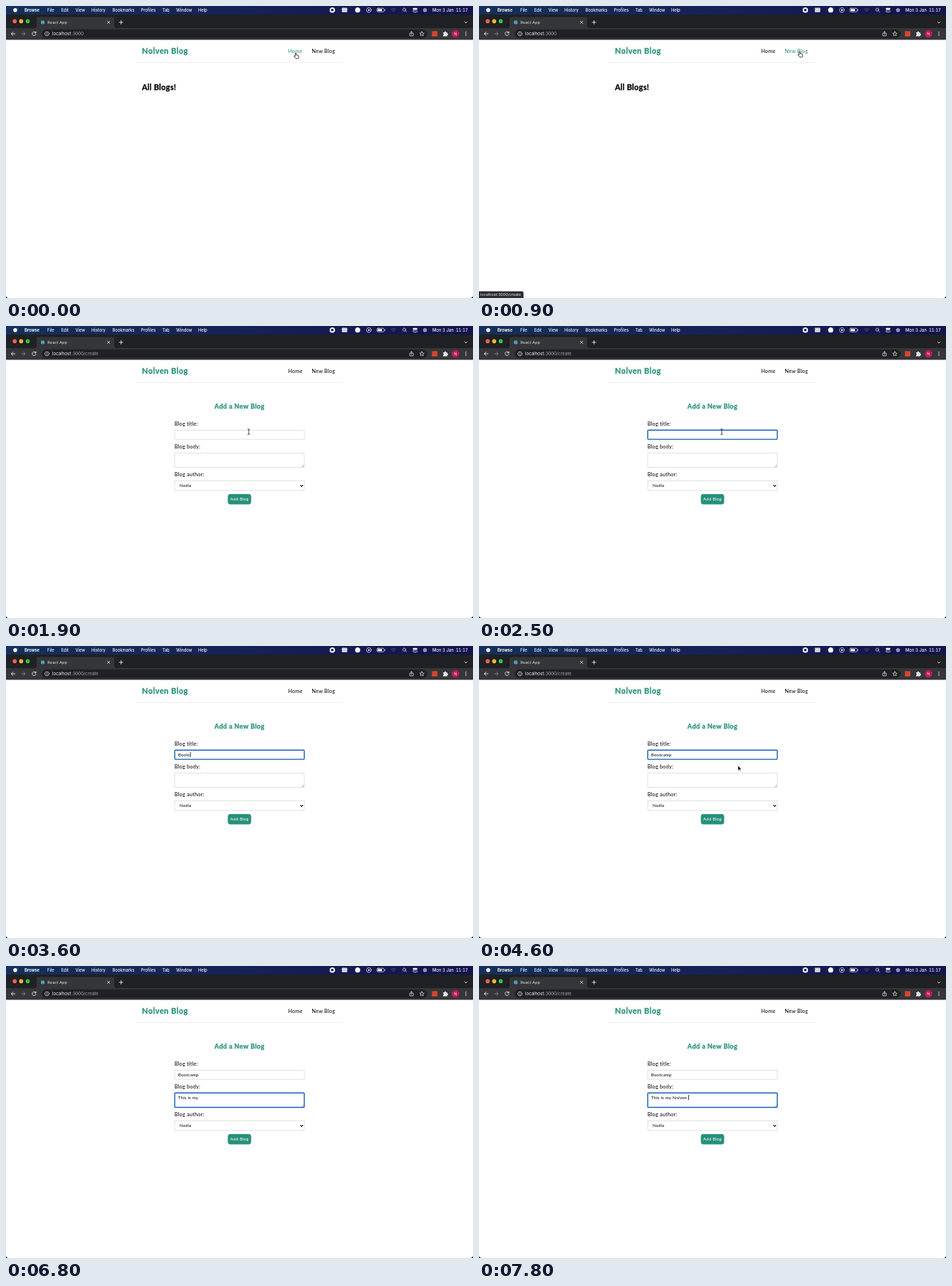
An HTML page that plays this animation: 656 by 410 pixels, repeating every 8 s.

```html
<!DOCTYPE html>
<html lang="en">
<head>
<meta charset="utf-8">
<title>Blog form</title>
<style>
  html, body { margin: 0; width: 100%; height: 100%; overflow: hidden; background: #101216; }
  svg { display: block; width: 656px; height: 410px; }
  text { white-space: pre; }
  .bar { font: 500 5.85px Inter, sans-serif; fill: #f4f6fb; letter-spacing: -.01em; }
  .bar .app { font-weight: 700; }
  .bar .clock { font-variant-numeric: tabular-nums; letter-spacing: .005em; }
  .ui { font: 400 5.47px Inter, sans-serif; fill: #e8eaed; }
  .url { font-size: 6.38px; letter-spacing: -.01em; }
  .page { font: 400 7.29px Lato, sans-serif; letter-spacing: .03em; color: #000; fill: currentColor; }
  .page text { fill: currentColor; }
  .page .h, .page .sub { font-weight: 700; stroke: currentColor; stroke-width: .28; }
  .page .h { font-size: 10.93px; }
  .page .sub { font-size: 9.11px; letter-spacing: .044em; }
  .page .field { font-size: 6.07px; }
  .page .green { color: #27917a; }
  .page .white { color: #fff; }
  .box { fill: #fff; stroke: #d9d9d9; stroke-width: .8; }
  .ring { fill: none; stroke: #1a62b8; stroke-width: 1.4; }
  .line { fill: none; stroke: #e8eaed; stroke-width: .9; stroke-linecap: round; stroke-linejoin: round; }
  .thin { stroke-width: .7; }
  .dim { stroke: #808388; }
</style>
</head>
<body>
<svg viewBox="0 0 656 410">
  <defs>
    <linearGradient id="sky">
      <stop offset="0" stop-color="#15305a"/>
      <stop offset=".45" stop-color="#14235a"/>
      <stop offset="1" stop-color="#15134a"/>
    </linearGradient>
  </defs>

  <!-- menu bar -->
  <rect width="656" height="20" fill="url(#sky)"/>
  <g class="bar" id="menu">
    <circle cx="13" cy="5.7" r="2.8"/>
    <text class="app" x="26" y="7.8">Browse</text>
    <text class="clock" x="599" y="7.8">Mon 3 Jan  11:17</text>
  </g>
  <g fill="#f4f6fb">
    <circle cx="458.4" cy="5.7" r="3.8"/>
    <rect x="456.8" y="4.1" width="3.2" height="3.2" rx=".5" fill="#15205a"/>
    <rect x="471.8" y="2.6" width="7.6" height="6.2" rx="1" fill="#d3d6e2"/>
    <circle cx="494" cy="5.7" r="3.6"/>
    <path d="M508.9 4v3.4l2.8-1.7z"/>
    <rect x="522" y="4.2" width="6.2" height="3" rx=".6"/>
    <rect x="532" y="4.9" width=".8" height="1.7" rx=".4"/>
    <rect x="571.4" y="2.8" width="6.4" height="2.5" rx="1.25"/>
    <circle cx="588.6" cy="5.7" r="2.8" fill="#8d93c4"/>
  </g>
  <g class="line thin">
    <circle cx="509.8" cy="5.7" r="3.3"/>
    <rect x="521" y="3.2" width="10.2" height="5" rx="1.4"/>
    <path d="M541 4.8q3.4-2.8 6.8 0M542.3 6.3q2.1-1.8 4.2 0M544.1 7.7h.6" stroke="#5c648f"/>
    <circle cx="559.5" cy="5.1" r="2.1"/><path d="M561 6.7l1.7 1.8"/>
    <rect x="571.6" y="6.3" width="6" height="2.2" rx="1.1"/>
  </g>

  <!-- browser window -->
  <path d="M0 48V16q0-4 4-4H652q4 0 4 4V48z" fill="#202124"/>
  <path d="M0 31H40q3 0 3-3V18.5q0-3 3-3H149q3 0 3 3V28q0 3 3 3H656V48H0z" fill="#35363a"/>
  <circle cx="12.2" cy="21.4" r="2.8" fill="#fb5f57"/>
  <circle cx="21.3" cy="21.4" r="2.8" fill="#fcbb2f"/>
  <circle cx="30.5" cy="21.4" r="2.8" fill="#2ac840"/>
  <circle cx="51.6" cy="22.9" r="2.7" fill="#4e9dbb"/>
  <text class="ui" x="58.3" y="24.9" letter-spacing=".1">React App</text>
  <rect x="50" y="32.8" width="542" height="12.4" rx="6.2" fill="#202124"/>
  <g class="line">
    <path d="M142.5 21.3l3.2 3.2m0-3.2l-3.2 3.2"/>
    <path d="M159.1 22.9h5m-2.5-2.5v5"/>
    <path d="M644.3 22.2l1.8 1.7 1.8-1.7"/>
    <path d="M12.7 39h-5.2m2.4-2.5l-2.5 2.5 2.5 2.5"/>
    <path class="dim" d="M21.8 39h5.2m-2.4-2.5l2.5 2.5-2.5 2.5"/>
    <path d="M41.7 37.3a2.7 2.7 0 1 0 .4 2.2M42.1 36v1.8h-1.9"/>
  </g>
  <g class="line thin">
    <circle cx="57.5" cy="39" r="2.9"/><path d="M57.5 38.7v1.7m0-3.1v.1"/>
    <path d="M568.5 38.3h-1.4v3.6h5v-3.6h-1.4M569.6 40v-4m-1.3 1.2l1.3-1.3 1.3 1.3"/>
    <path d="M584.2 35.9l.9 2.1 2.2.2-1.7 1.5.5 2.2-1.9-1.2-1.9 1.2.5-2.2-1.7-1.5 2.2-.2z"/>
  </g>
  <rect x="598.4" y="35.3" width="7.6" height="7.4" rx="1" fill="#d8452e"/>
  <path d="M614 37h1.8a1.2 1.2 0 0 1 2.4 0h1.6v1.7a1.2 1.2 0 0 1 0 2.4v1.3H614v-1.7a1.1 1.1 0 0 0 0-2.2z" fill="#e8eaed"/>
  <circle cx="631.4" cy="39" r="5.3" fill="#c2185b"/>
  <text class="ui" x="631.4" y="41" text-anchor="middle">N</text>
  <g fill="#e8eaed">
    <circle cx="646" cy="36.7" r=".75"/><circle cx="646" cy="39" r=".75"/><circle cx="646" cy="41.3" r=".75"/>
  </g>
  <text class="ui url" x="64.7" y="41.2">localhost<tspan fill="#9aa0a6">:3000<tspan id="path">/create</tspan></tspan></text>

  <!-- page -->
  <path d="M0 47.6H656V406q0 4-4 4H4q-4 0-4-4z" fill="#fff"/>
  <path d="M182 79.5H473" stroke="#f0f0f0"/>
  <g class="page">
    <text class="h green" x="191" y="67.4" style="letter-spacing:.045em">Nolven Blog</text>
    <text id="home" x="396.2" y="66.2">Home</text>
    <text id="new" x="429.5" y="66.2">New Blog</text>
    <text id="list" class="h" x="191" y="118" style="letter-spacing:.025em">All Blogs!</text>
    <g id="form">
      <text class="sub green" x="328" y="116.3" text-anchor="middle">Add a New Blog</text>
      <text x="236.8" y="139.7">Blog title:</text>
      <text x="236.8" y="171.5">Blog body:</text>
      <text x="236.8" y="210.6">Blog author:</text>
      <rect class="box" x="237" y="146.3" width="182" height="12.8"/>
      <rect class="box" x="237" y="178.3" width="182" height="20.2"/>
      <rect class="box" x="237" y="217.3" width="182" height="13.6"/>
      <path d="M415.5 197.8l2.9-2.9m-1.3 2.9l1.3-1.3" stroke="#777" stroke-width=".6"/>
      <path d="M413.4 223.4l1.9 1.9 1.9-1.9" fill="none" stroke="#000" stroke-width="1.1"/>
      <text class="field" x="243.8" y="226.4">Nadia</text>
      <rect x="311.6" y="236" width="32.8" height="14.4" rx="3.6" fill="#27917a"/>
      <text class="field white" x="328" y="245.4" text-anchor="middle">Add Blog</text>
      <rect id="ring" class="ring" x="237" width="182" rx="1"/>
      <text id="title" class="field" xml:space="preserve" x="241.8" y="154.9"></text>
      <text id="body" class="field" xml:space="preserve" x="241.8" y="186.7"></text>
      <rect id="caret" width=".8" height="7"/>
    </g>
  </g>

  <g id="status">
    <path id="bubble" fill="#2b2c30" stroke="#000" stroke-opacity=".22"/>
    <text id="link" class="ui" x="2" y="407.3"></text>
  </g>

  <g id="pointer" stroke-linejoin="round">
    <path id="hand" d="M-1.8 .6V-3q0-.9.8-.9t.8.9v2.1q.8-.6 1.3.1.7-.4 1.1.2 1-.2 1 .8v1.6Q3.2 3.8 1.8 3.8H-.6Q-1.5 3.6-3.3 .9q-.2-.9.6-.9z" fill="#fff" stroke="#000" stroke-width=".75"/>
    <path id="beam" d="M-1.7-3.9Q0-3.9 0-2.9 0-3.9 1.7-3.9M0-3V3M-1.7 3.9Q0 3.9 0 2.9 0 3.9 1.7 3.9" fill="none" stroke="#111" stroke-width=".8"/>
    <path id="arrow" d="M-2.2-4V3.2L-.6 1.7.4 4.1 1.5 3.6.5 1.3H2.7z" fill="#000" stroke="#fff" stroke-width=".6"/>
  </g>
</svg>
<script>
const LOOP = 8000, STEP = 100;
const el = Object.fromEntries([...document.querySelectorAll('[id]')].map(n => [n.id, n]));
const show = (node, on) => { node.style.display = on ? '' : 'none'; };
const clamp = v => Math.max(0, Math.min(1, v));

const menu = { File: 58, Edit: 77.5, View: 97.5, History: 120, Bookmarks: 149.5, Profiles: 189.5, Tab: 219.5, Window: 239, Help: 270 };
for (const [label, x] of Object.entries(menu)) {
  const item = document.createElementNS('http://www.w3.org/2000/svg', 'text');
  item.setAttribute('x', x);
  item.setAttribute('y', 7.8);
  item.textContent = label;
  el.menu.append(item);
}

// Pointer path: time, x, y
const track = [
  [0, 408, 70], [200, 408, 70], [600, 418, 70], [700, 418, 70], [900, 451.5, 68],
  [1200, 451.5, 68], [1500, 395, 108], [1700, 343, 130], [1900, 341, 148.5],
  [4200, 341, 148.5], [4400, 368, 160], [4500, 375, 165], [4700, 357, 178.5], [LOOP, 357, 178.5]
];

// Typing: time and number of characters
const fields = {
  title: { text: 'Bootcamp', top: 146.3, height: 12.8, caret: 149, from: 2000, to: 4700,
    keys: [[2000, 0], [3100, 1], [3300, 3], [3400, 4], [3600, 5], [3800, 6], [3900, 7], [4000, 8]] },
  body: { text: 'This is my Nolven ', top: 178.3, height: 20.2, caret: 181, from: 4700, to: LOOP,
    keys: [[4700, 0], [5300, 1], [5500, 2], [5600, 3], [5700, 4], [5800, 5], [5900, 6], [6000, 7],
      [6100, 8], [6200, 9], [6300, 11], [6900, 12], [7100, 13], [7300, 14], [7400, 15], [7600, 16], [7700, 17], [7800, 18]] }
};

function pointerAt(t) {
  const i = track.findIndex(k => k[0] > t);
  const [t0, x0, y0] = track[i - 1], [t1, x1, y1] = track[i];
  const p = (t - t0) / (t1 - t0);
  return [x0 + (x1 - x0) * p, y0 + (y1 - y0) * p];
}

function drawField(name, t) {
  const f = fields[name], node = el[name];
  const [last, count] = f.keys.filter(k => k[0] <= t).pop() || [0, 0];
  node.textContent = f.text.slice(0, count);
  if (t < f.from || t >= f.to) return;
  el.ring.setAttribute('y', f.top);
  el.ring.setAttribute('height', f.height);
  el.caret.setAttribute('x', 241.8 + (count ? node.getComputedTextLength() : 0));
  el.caret.setAttribute('y', f.caret);
  show(el.caret, (t - last) % 1000 < 500);
}

function draw(t) {
  const form = t >= 1200;
  const [x, y] = pointerAt(t);
  const onNav = y > 56 && y < 73;
  const onHome = onNav && x > 393 && x < 421, onNew = onNav && x > 426 && x < 465;
  const onText = form && (y > 146 && y < 160 || y > 177 && y < 199);

  el.home.classList.toggle('green', onHome);
  el.new.classList.toggle('green', onNew);
  show(el.path, form);
  show(el.list, !form);
  show(el.form, form);

  el.pointer.setAttribute('transform', `translate(${x} ${y})`);
  show(el.pointer, t < 3100 || t >= 4300 && t < 5300);
  show(el.hand, onHome || onNew);
  show(el.beam, onText);
  show(el.arrow, !onHome && !onNew && !onText);

  const deep = t >= 800;
  el.link.textContent = 'localhost:3000' + (deep ? '/create' : '');
  el.bubble.setAttribute('d', `M-2 400.8H${deep ? 60.4 : 43}q2 0 2 2V412H-2z`);
  el.status.style.opacity = clamp((t - 200) / 300) * clamp((1700 - t) / 400);

  show(el.ring, t >= 2000);
  show(el.caret, false);
  drawField('title', t);
  drawField('body', t);
}

let start;
function tick(now) {
  start ??= now;
  const t = (now - start) % LOOP;
  draw(Math.floor(t / STEP) * STEP);
  requestAnimationFrame(tick);
}
draw(0);
requestAnimationFrame(tick);
</script>
</body>
</html>
```
